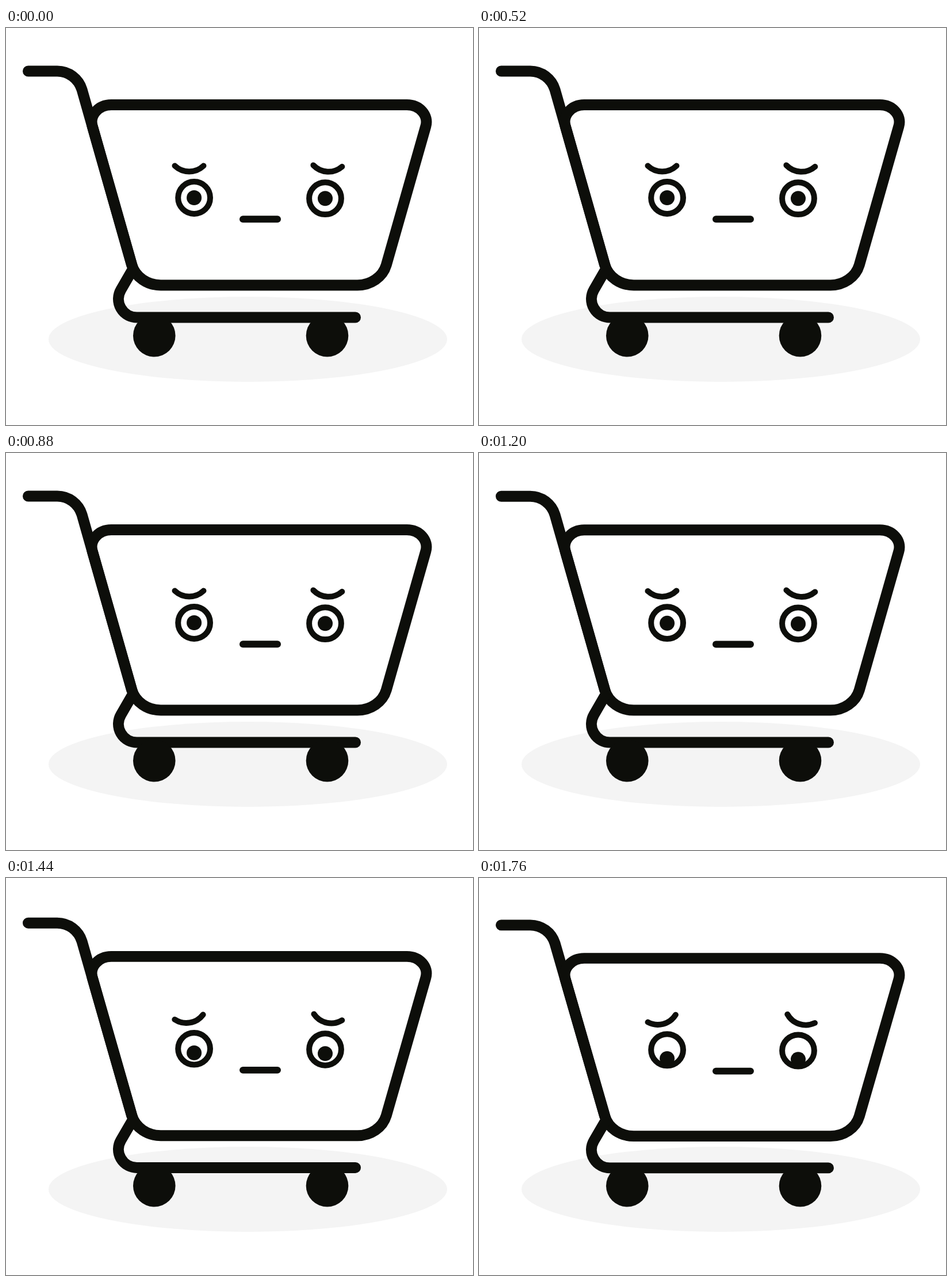
Animation, 812 px wide and 690 px high, one loop 2040 ms. Source, as an HTML page:

```html
<!DOCTYPE html>
<html lang="en">
<head>
<meta charset="utf-8">
<title>Sad cart</title>
<style>
  html, body { margin: 0; width: 100%; height: 100%; overflow: hidden; background: #fff; }
  svg { display: block; width: 100vw; height: 100vh; }
  .line { fill: none; stroke: #0d0e0a; stroke-linecap: round; stroke-linejoin: round; }
  .fill { fill: #0d0e0a; }
</style>
</head>
<body>
<svg viewBox="0 0 812 690">
  <defs>
    <clipPath id="socket"><circle r="28"/></clipPath>
    <path id="brow" class="line" stroke-width="10" d="M-25 -3A36.25 36.25 0 0 0 25 -3"/>
  </defs>
  <ellipse cx="420.5" cy="541" rx="346.5" ry="74" fill="#f4f4f4"/>
  <g id="cart">
    <g class="line" stroke-width="19">
      <path d="M38.5 75H89C109 75 126 88 132 107L218.8 412"/>
      <path d="M183 133.5H697C719 133.5 735.5 151.5 729.8 171L661.2 412C655 433 634 447 611 447H269C246 447 225 433 218.8 412L150.2 171C144.5 151.5 161 133.5 183 133.5Z"/>
      <path d="M218.3 423L199.8 455A32 32 0 0 0 227.5 503H607.5"/>
    </g>
    <circle class="fill" cx="257.8" cy="534.7" r="36.8"/>
    <circle class="fill" cx="558.5" cy="534.7" r="36.8"/>
    <path class="line" stroke-width="12" d="M412 332.3H472"/>
    <g id="face"></g>
  </g>
</svg>
<script>
const LOOP = 2040, STEP = 40;
const GROUND = 571.5, SQUASH = 0.0137, LOOK = 15.2, TILT = 15;
const BLINKS = [240, 600];

const $ = id => document.getElementById(id);
const clamp = v => Math.min(1, Math.max(0, v));

// Cubic bezier easing whose handles lie flat at both ends
function flatEase(x1, x2) {
  return u => {
    if (u <= 0 || u >= 1) return clamp(u);
    let lo = 0, hi = 1, s = 0.5;
    for (let i = 0; i < 24; i++) {
      s = (lo + hi) / 2;
      const r = 1 - s;
      const x = 3 * s * r * r * x1 + 3 * s * s * r * x2 + s ** 3;
      if (x < u) lo = s; else hi = s;
    }
    return s * s * (3 - 2 * s);
  };
}

const sink = flatEase(0.69, 0.49);
const frown = flatEase(0.75, 0.28);

const sides = [
  { x: 327.1, y: 295, browX: 318.5, browY: 242.5, tilt: 0, dir: -1 },
  { x: 555, y: 296.2, browX: 559.2, browY: 242.7, tilt: 2.8, dir: 1 }
];

$('face').innerHTML = sides.map((s, i) => `
  <g transform="translate(${s.x} ${s.y})">
    <circle class="fill" id="pupil${i}" r="13"/>
    <g clip-path="url(#socket)"><rect class="fill" id="lid${i}" x="-40" y="-100" width="80"/></g>
    <circle class="line" r="27.9" stroke-width="10"/>
  </g>
  <use href="#brow" id="brow${i}"/>`).join('');

// Close for 120 ms, stay shut for 40 ms, open for 120 ms
function blink(t) {
  return Math.max(...BLINKS.map(start => {
    const d = t - start;
    return clamp(Math.min(d, 280 - d) / 120);
  }));
}

function draw(t) {
  const u = clamp((t - 1040) / 720);
  const drop = sink(u), sad = frown(u);
  const lidEdge = -33 + 58 * blink(t);

  $('cart').setAttribute('transform',
    `translate(0 ${GROUND}) scale(1 ${1 - SQUASH * drop}) translate(0 ${-GROUND})`);
  sides.forEach((s, i) => {
    $('pupil' + i).setAttribute('cy', LOOK * drop);
    $('lid' + i).setAttribute('height', 100 + lidEdge);
    $('brow' + i).setAttribute('transform',
      `translate(${s.browX} ${s.browY}) rotate(${s.tilt + s.dir * TILT * sad})`);
  });
}

const begin = performance.now();
function tick() {
  const t = (performance.now() - begin) % LOOP;
  draw(Math.floor(t / STEP) * STEP);
  requestAnimationFrame(tick);
}
tick();
</script>
</body>
</html>
```
